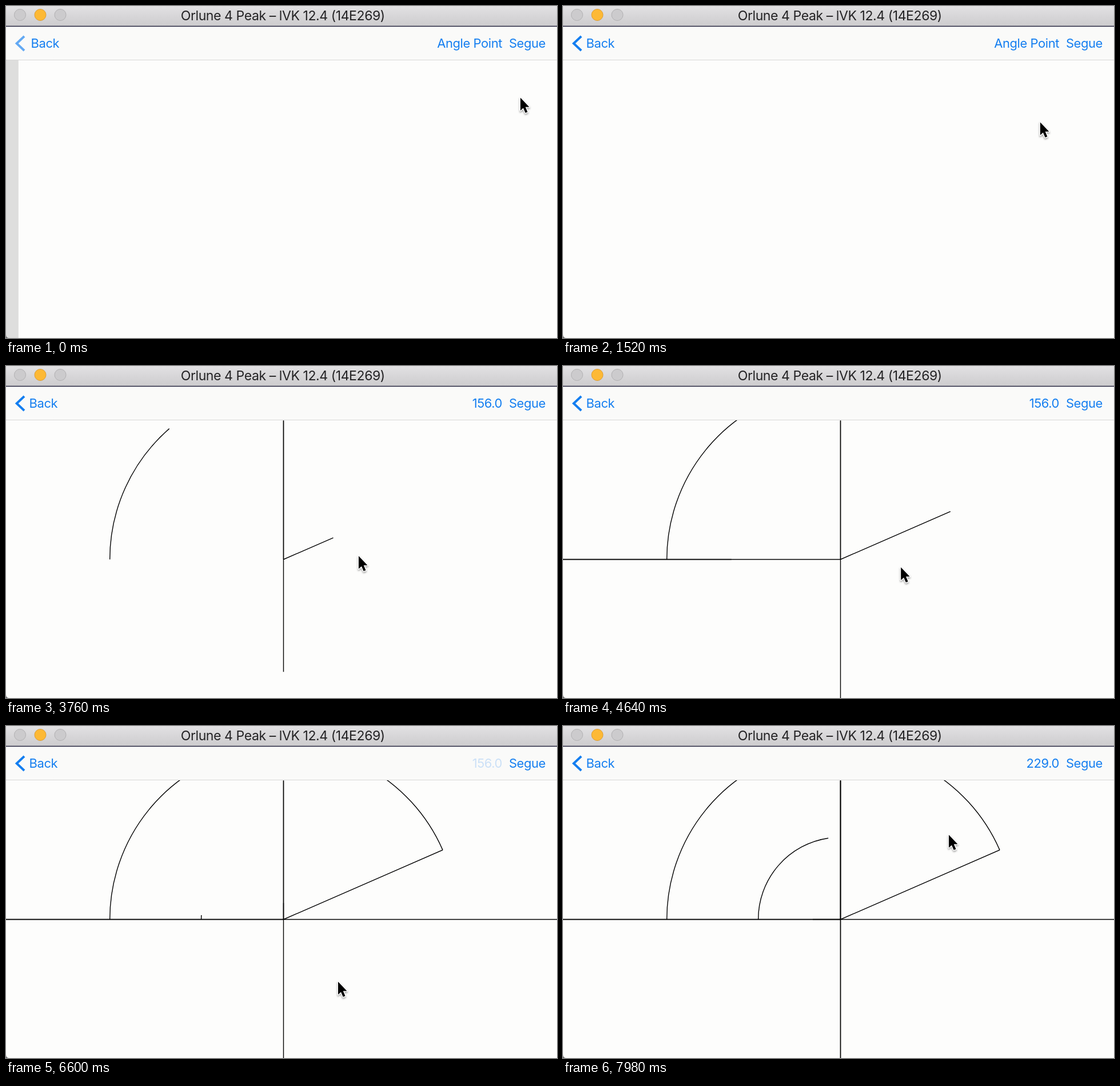
An HTML page that plays this animation: 964 px wide and 581 px high, repeating every 8 s.

```html
<!DOCTYPE html>
<html lang="en">
<head>
<meta charset="utf-8">
<title>Angle point</title>
<style>
  html, body { margin: 0; width: 100%; height: 100%; overflow: hidden; background: #fdfdfc; }
  svg { display: block; width: 964px; height: 581px; }
  text { font: 22px Inter, Roboto, sans-serif; letter-spacing: -0.02em; fill: #147ef0; }
  .title { font-size: 23.1px; fill: #242325; text-anchor: middle; }
  .right { text-anchor: end; }
  .stroke { fill: none; stroke: #000; stroke-width: 1.4; }
  .light { fill: #cccbcd; stroke: #b1b0b2; }
  .light.on { fill: #fdb935; stroke: #dd9d33; }
  #cursor { filter: drop-shadow(0 2px 1.5px rgba(0, 0, 0, .35)); }
</style>
</head>
<body>
<svg viewBox="0 0 964 581">
  <defs>
    <linearGradient id="bar" x2="0" y2="1">
      <stop stop-color="#e2e1e3"/>
      <stop offset="1" stop-color="#cccbcd"/>
    </linearGradient>
  </defs>
  <rect width="964" height="581" fill="#fdfdfc"/>
  <g id="drawing"></g>
  <rect id="strip" y="95" height="486" fill="#dededd"/>

  <rect y="36" width="964" height="59" fill="#fafaf9"/>
  <path d="M0 94.5H964" stroke="#b4b4b4" stroke-dasharray="1 1"/>
  <rect width="964" height="36" fill="url(#bar)"/>
  <path d="M0 35.5H964" stroke="#25253f" stroke-width="1.4"/>
  <circle class="light" cx="24.5" cy="15.5" r="10"/>
  <circle class="light on" cx="60" cy="15.5" r="10"/>
  <circle class="light" cx="95" cy="15.5" r="10"/>
  <text class="title" x="484.3" y="25">Orlune 4 Peak – lVK 12.4 (14E269)</text>

  <path id="chevron" d="M32 53L18.7 65.5L32 78" fill="none" stroke="#147ef0" stroke-width="4"/>
  <text id="back" x="40.6" y="73">Back</text>
  <text id="label" class="right" x="868" y="73"></text>
  <text class="right" x="944" y="73">Segue</text>
  <path d="M0 575Q0 581 6 581H0Z" fill="#666"/>
  <path id="cursor" d="M1 0.5V23L6 18.5L9.7 27L13.5 25.5L9.8 16.8H16.5Z"
    stroke="#fff" stroke-width="3" paint-order="stroke" stroke-linejoin="round"/>
</svg>
<script>
const LOOP = 8000;
const CX = 485.5, CY = 338.5, HALF_W = 485.5, HALF_H = 243;
const AXIS_LENGTH = 3 * (HALF_W + HALF_H);
const byId = id => document.getElementById(id);
const clamp = v => Math.min(1, Math.max(0, v));

const taps = [
  { start: 2312, duration: 2914, x: 764, y: 217, spoke: true, before: 'Angle Point', after: '156.0' },
  { start: 6333, duration: 3070, x: 580, y: 447, spoke: false, before: '156.0', after: '229.0' },
];

// Time, then the position of the pointer tip.
const pointerPath = [
  [0, 899, 160], [760, 872, 177], [1520, 834, 203], [2060, 770, 226], [2270, 764, 217],
  [2860, 764, 217], [3760, 616, 332], [4920, 582, 358], [5580, 542, 402], [6160, 576, 452],
  [6320, 580, 447], [6760, 580, 447], [7980, 674, 190], [LOOP, 674, 190],
];

// Ease-in: the Bézier curve (0.42, 0, 1, 1).
function easeIn(x) {
  let low = 0, high = 1;
  for (let i = 0; i < 20; i++) {
    const s = (low + high) / 2;
    const at = 1.26 * s * (1 - s) ** 2 + 3 * s * s - 2 * s ** 3;
    if (at < x) low = s; else high = s;
  }
  return 3 * low ** 2 - 2 * low ** 3;
}

function addStroke(d, from = 0, to = 1) {
  const node = document.createElementNS('http://www.w3.org/2000/svg', 'path');
  node.setAttribute('d', d);
  node.setAttribute('class', 'stroke');
  node.setAttribute('pathLength', 1);
  node.setAttribute('stroke-dasharray', '1 2');
  byId('drawing').append(node);
  return { node, from, to };
}

function buildTap(tap) {
  const dx = tap.x - CX, dy = tap.y - CY;
  const r = Math.hypot(dx, dy);
  const arc = addStroke(`M${CX - r} ${CY}A${r} ${r} 0 ${dy > 0 ? 1 : 0} 1 ${tap.x} ${tap.y}`);
  const strokes = [arc];
  if (tap.spoke) strokes.push(addStroke(`M${CX} ${CY}L${tap.x} ${tap.y}`));

  // The axes are one long path: out to one edge, then back across the stage.
  let done = 0;
  const axis = (x1, y1, x2, y2) => {
    const from = done / AXIS_LENGTH;
    done += Math.hypot(x2 - x1, y2 - y1);
    strokes.push(addStroke(`M${x1} ${y1}L${x2} ${y2}`, from, done / AXIS_LENGTH));
  };
  axis(CX, CY, CX, CY - HALF_H);
  axis(CX, CY - HALF_H, CX, CY + HALF_H);
  axis(CX, CY, CX - HALF_W, CY);
  axis(CX - HALF_W, CY, CX + HALF_W, CY);
  tap.strokes = strokes;
}

function drawTap(tap, t) {
  const p = easeIn(clamp((t - tap.start) / tap.duration));
  for (const { node, from, to } of tap.strokes) {
    const part = clamp((p - from) / (to - from));
    node.style.visibility = t > tap.start && part > 0 ? 'visible' : 'hidden';
    node.setAttribute('stroke-dashoffset', 1 - part);
  }
}

function drawLabel(t) {
  const tap = t < taps[1].start ? taps[0] : taps[1];
  const since = t - tap.start;
  const changed = since > 420;
  byId('label').textContent = changed ? tap.after : tap.before;
  byId('label').setAttribute('opacity', changed ? clamp((since - 530) / 200) : 1 - clamp((since - 100) / 210));
}

function drawPointer(t) {
  const i = pointerPath.findIndex(step => step[0] > t);
  const [t0, x0, y0] = pointerPath[i - 1], [t1, x1, y1] = pointerPath[i];
  const k = (t - t0) / (t1 - t0);
  byId('cursor').setAttribute('transform', `translate(${x0 + (x1 - x0) * k} ${y0 + (y1 - y0) * k})`);
}

function drawSlide(t) {
  const left = t < 500 ? Math.exp(-t / 110) : 0;
  byId('strip').setAttribute('width', 22 * left);
  byId('back').setAttribute('x', 40.6 + 3 * left);
  byId('chevron').setAttribute('opacity', 1 - 0.35 * left);
}

function frame() {
  const t = performance.now() % LOOP;
  drawSlide(t);
  taps.forEach(tap => drawTap(tap, t));
  drawLabel(t);
  drawPointer(t);
  requestAnimationFrame(frame);
}

taps.forEach(buildTap);
frame();
</script>
</body>
</html>
```
